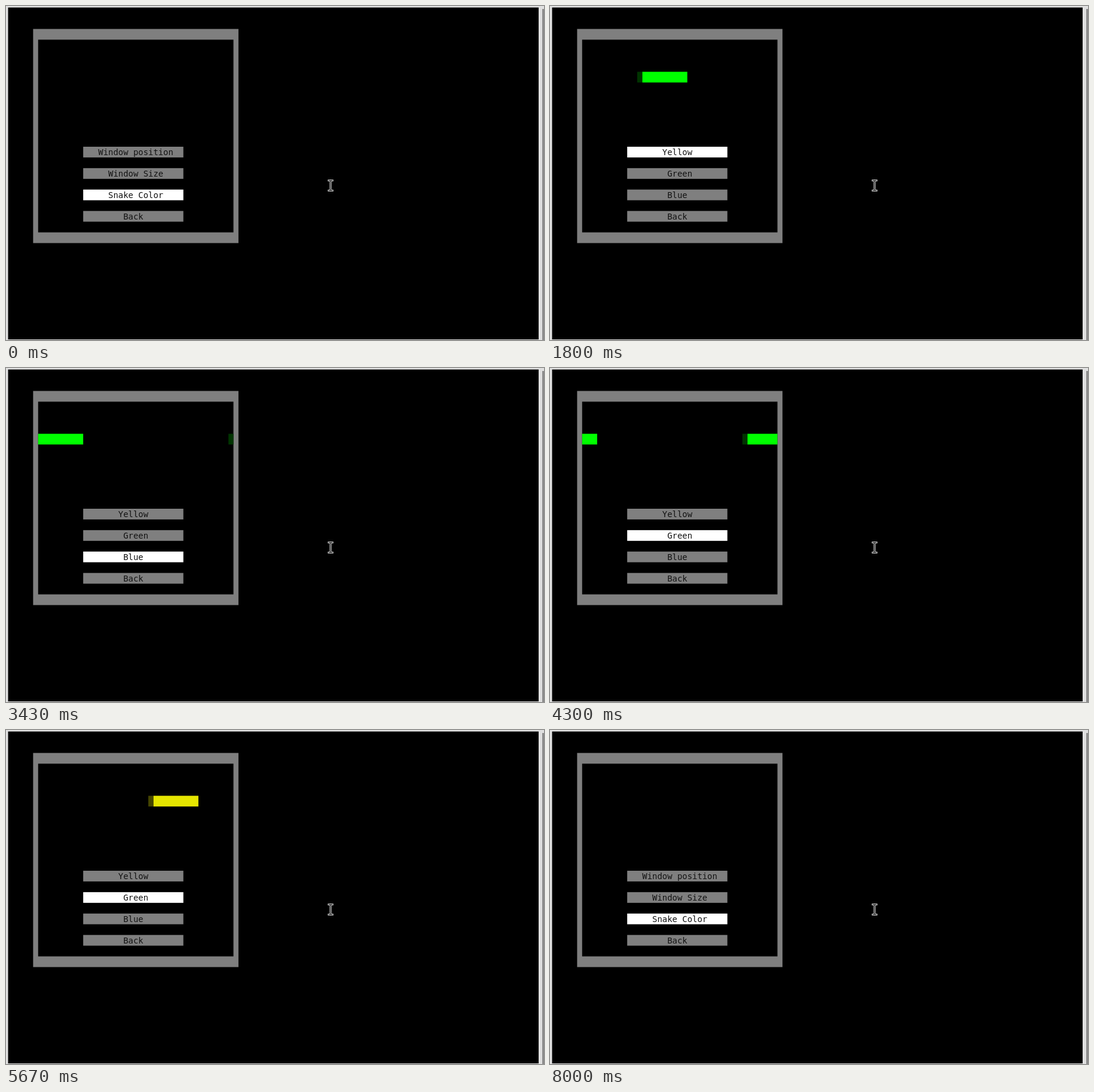
Recreate the animation shown at these times as an HTML page. Size 900 px wide and 560 px high, loop 8.06 s.

```html
<!DOCTYPE html>
<html lang="en">
<head>
<meta charset="utf-8">
<title>Snake settings</title>
<style>
html, body { margin: 0; width: 100%; height: 100%; overflow: hidden; background: #000; }
svg { display: block; }
text { font: 13.92px "DejaVu Sans Mono", monospace; fill: #121212; white-space: pre; }
</style>
</head>
<body>
<svg id="stage" width="900" height="560" viewBox="0 0 900 560"></svg>
<script>
const LOOP = 8060, COLS = 39, LENGTH = 10;
const CELL_W = 8.378, CELL_H = 17.95;
const GRAY = '#7f7f7f', PALE = '#e0e0e0';
const stage = document.getElementById('stage');

// terminal grid: column 0 is the first cell inside the frame
const colX = c => 53.75 + c * CELL_W;
const rowY = r => 38.5 + r * CELL_H;

function set(el, attrs) {
  for (const k in attrs) el.setAttribute(k, attrs[k]);
  return el;
}
const add = (tag, attrs) =>
  stage.appendChild(set(document.createElementNS('http://www.w3.org/2000/svg', tag), attrs));
const box = (x, y, width, height, fill) => add('rect', { x, y, width, height, fill });
const cells = (c, r, w, h, fill) => box(colX(c), rowY(r), w * CELL_W, h * CELL_H, fill);

// terminal window edges
box(0, 0, 900, 560, PALE);
box(3.5, 2.5, 887.5, 556.5, '#000');
box(897, 5, 3, 555, '#8c8c8c');

// game frame
cells(-1, 0, COLS + 2, 20, GRAY);
cells(0, 1, COLS, 18, '#000');

// the body may wrap, so it has a left and a right piece
const body = [cells(0, 4, 0, 1), cells(0, 4, 0, 1)];
const face = cells(0, 4, 1, 1);

const buttons = [11, 13, 15, 17].map(r => ({
  bar: cells(9, r, 20, 1, GRAY),
  label: add('text', { y: rowY(r) + 14 })
}));

// mouse pointer
const beam = 'M540 292.5H542L543 293.5L544 292.5H546M543 293.5V308.5M540 309.5H542L543 308.5L544 309.5H546';
for (const [stroke, width] of [['#d8d8d8', 3.2], ['#000', 1.1]])
  add('path', { d: beam, fill: 'none', stroke, 'stroke-width': width, 'stroke-linecap': 'square' });

const SETTINGS = ['Window position', 'Window Size', 'Snake Color', 'Back'];
const COLORS = ['Yellow', 'Green', 'Blue', 'Back'];
const PAINT = {
  Yellow: ['#454500', '#e5e500'],
  Green: ['#003400', '#00ff00'],
  Blue: ['#00004e', '#1e32f0']
};

const OPEN = 570, CLOSE = 6900, FIRST = 20;
// key presses in the color menu: up, down, or 0 for enter
const KEYS = [[1830, 1], [2770, 1], [3730, -1], [4630, -1], [4770, 0], [5300, 1], [5830, 1], [6030, 0], [6400, 1]];
// time and cells crawled so far
const CRAWL = [[OPEN, 0], [1400, 7], [2530, 15], [4300, 27], [5030, 32], [6530, 45], [CLOSE, 48]];

function crawled(t) {
  const i = CRAWL.findIndex(p => p[0] > t);
  const [t0, n0] = CRAWL[i - 1], [t1, n1] = CRAWL[i];
  return Math.floor(n0 + (n1 - n0) * (t - t0) / (t1 - t0));
}

function menuAt(t) {
  let pick = 0, skin = 'Green';
  for (const [time, move] of KEYS) {
    if (time > t) break;
    pick += move;
    if (!move) skin = COLORS[pick];
  }
  return { pick, skin };
}

function showMenu(items, pick) {
  buttons.forEach(({ bar, label }, i) => {
    const name = items[i];
    set(bar, { fill: i === pick ? '#fff' : GRAY });
    set(label, { x: colX(9 + Math.ceil((20 - name.length) / 2)) });
    if (label.textContent !== name) label.textContent = name;
  });
}

function showSnake(head, [dark, bright]) {
  const from = head + 1, to = head + LENGTH;
  const spans = [[0, Math.max(0, to - COLS)], [from, Math.max(from, Math.min(to, COLS))]];
  body.forEach((piece, i) => {
    const [a, b] = spans[i];
    set(piece, { x: colX(a), width: (b - a) * CELL_W, fill: bright });
  });
  set(face, { x: colX(head), fill: dark });
}

function draw(t) {
  const open = t >= OPEN && t < CLOSE;
  for (const part of [...body, face]) set(part, { visibility: open ? 'visible' : 'hidden' });
  if (!open) return showMenu(SETTINGS, 2);
  const { pick, skin } = menuAt(t);
  showMenu(COLORS, pick);
  showSnake((FIRST - crawled(t) + 2 * COLS) % COLS, PAINT[skin]);
}

let start;
function tick(now) {
  start ??= now;
  draw((now - start) % LOOP);
  requestAnimationFrame(tick);
}
draw(0);
requestAnimationFrame(tick);
</script>
</body>
</html>
```
